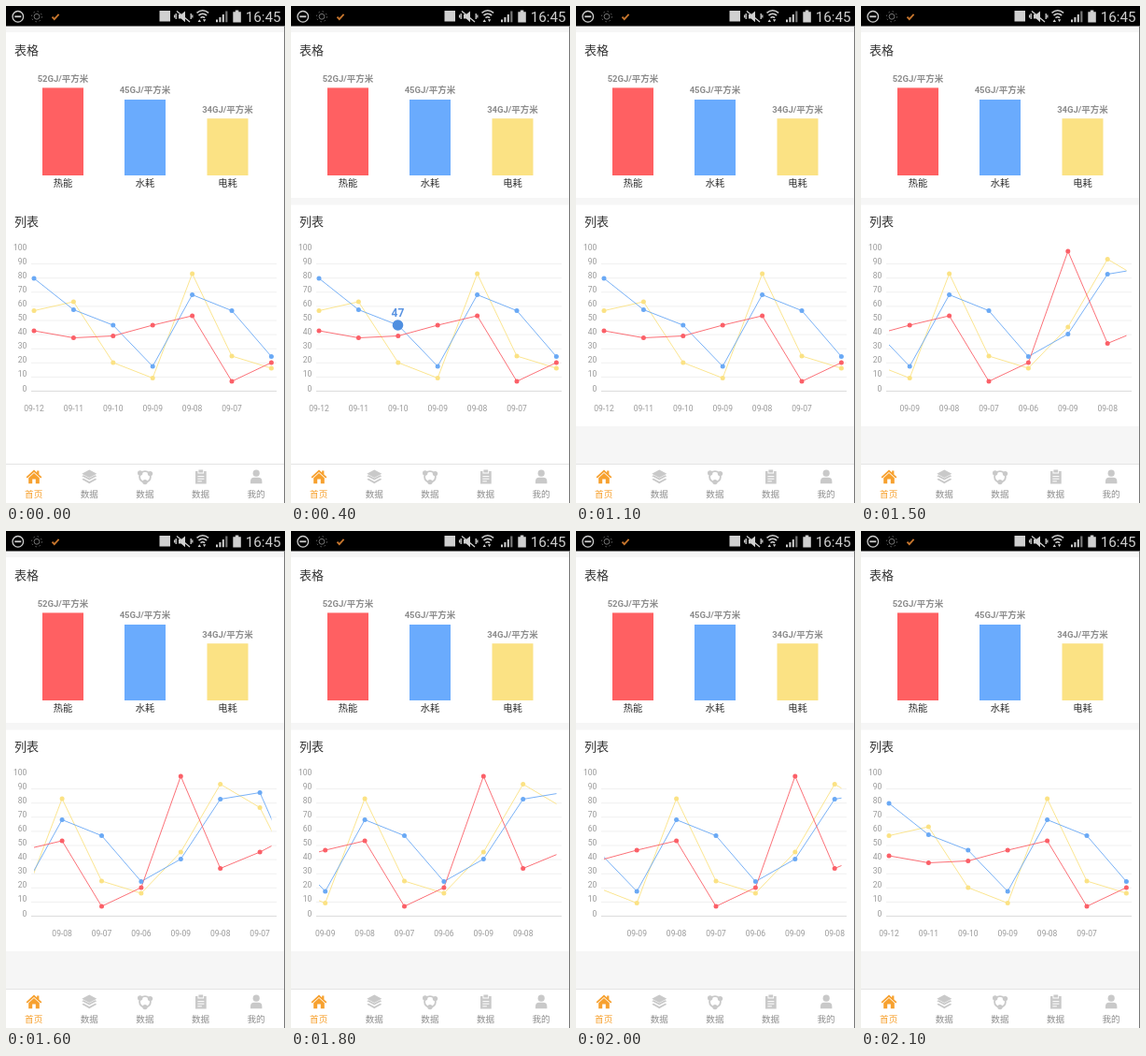
These frames come from a looping animation (299 px wide and 531 px high, 2.4 s). An HTML page:

```html
<!DOCTYPE html>
<html lang="zh">
<head>
<meta charset="utf-8">
<style>
html, body { margin: 0; width: 100%; height: 100%; overflow: hidden; background: #fff; }
svg { display: block; width: 100vw; height: 100vh; font-family: Roboto, "Noto Sans CJK SC", "Noto Sans CJK", sans-serif; }
text { text-anchor: middle; }
.line { fill: none; stroke-width: .9; }
</style>
</head>
<body>
<svg id="stage" viewBox="0 0 299 531" preserveAspectRatio="none">
  <defs><clipPath id="plot"><rect x="30" y="240" width="254.5" height="190"/></clipPath></defs>
  <rect width="299" height="531" fill="#fff"/>
  <rect y="21" width="299" height="7" fill="#f6f6f6"/>
  <rect id="gap" y="205" width="299" height="7.5" fill="#f6f6f6"/>
  <rect id="foot" y="449" width="299" height="40" fill="#f6f6f6"/>
  <g id="bars"></g>
  <g id="grid"></g>
  <g id="chart"></g>
  <g id="tip">
    <circle cx="114.5" cy="341" r="5.8" fill="#4f8fe0"/>
    <text x="114.5" y="331.8" font-size="12" font-weight="700" fill="#5b94e2">47</text>
  </g>
  <path d="M0 489.5H299" stroke="#e4e4e4"/>
  <g id="tabs"></g>
  <g fill="#c9c9c9">
    <path fill="#f7a12f" d="M21.6 503.3L30 495.6l3.2 2.9v-1.9h2.2v4l3 2.7-1.2 1.3-7.2-6.5-7.2 6.5zM24.2 504.2l5.8-5.2 5.8 5.2v6h-4v-4.6h-3.6v4.6h-4z"/>
    <path d="M89.3 495.6l8 4.2-8 4.2-8-4.2zM81.3 502.2l1.8-.9 6.2 3.2 6.2-3.2 1.8.9-8 4.2zM81.3 505.7l1.8-.9 6.2 3.2 6.2-3.2 1.8.9-8 4.5z"/>
    <circle cx="149" cy="503" r="5.9" fill="none" stroke="#c9c9c9" stroke-width="1.8"/>
    <circle cx="143.7" cy="499" r="2.7"/><circle cx="154.5" cy="499.6" r="2.7"/><circle cx="149" cy="508.6" r="2.7"/>
    <path d="M203 497h2.5v2.6h6.6V497h2.6v13.5H203zM206.4 495.4h4.8v3.2h-4.8z"/>
    <path d="M205.4 502.6h7M205.4 505.2h7M205.4 507.8h4.5" stroke="#fff"/>
    <circle cx="268.2" cy="499.2" r="3.6"/>
    <path d="M262 510.3v-2.4q0-4.1 4-4.1h4.4q4 0 4 4.1v2.4z"/>
  </g>
  <rect width="299" height="21.5" fill="#000"/>
  <g fill="none" stroke="#d0d0d0" stroke-width="1.3">
    <circle cx="12.8" cy="11.3" r="5.8"/>
    <path d="M9.3 11.3h7" stroke-width="1.8"/>
    <g stroke="#777" stroke-width="1">
      <circle cx="33" cy="11.3" r="2.9"/>
      <circle cx="33" cy="11.3" r="5.5" stroke-dasharray="1.3 3.02"/>
    </g>
    <path d="M49.5 11.6l2.3 2.5 4.8-5.2" stroke="#c9772e" stroke-width="1.8"/>
    <path d="M183 5.5l14 11.5M182.2 8v6M180.6 9.5v3M198.2 8v6M199.8 9.5v3"/>
    <path d="M204.5 7.3q6.3-5 12.6 0M206.5 10q4.3-3.4 8.6 0M208.5 12.6q2.3-1.8 4.6 0" stroke-width="1.6"/>
  </g>
  <g fill="#d0d0d0">
    <rect x="164.5" y="5" width="11.5" height="11.5"/>
    <path d="M185 9h2.7l4.3-3.6v11.8L187.700 13.600H185z"/>
    <path d="M207.300 14.200l1.700 2.800h-3.400zM212.600 17l1.700-2.800h-3.400z"/>
    <path d="M225 14.500h2v2.800h-2zM228.400 12h2v5.300h-2zM231.800 9h2v8.300h-2z"/>
    <path d="M235.200 5.500h2.200v11.800h-2.200z" fill="#777"/>
    <path d="M243.300 6.200h2.500V4.500h3.500v1.700h2.500v11.200h-8.500z"/>
    <text x="275.700" y="17" font-size="15.200">16:45</text>
  </g>
  <path d="M298.500 21.500V531" stroke="#777"/>
</svg>
<script>
const $ = id => document.getElementById(id);
const LOOP = 2400, LEFT = 30, RIGHT = 284.5, STEP = 42.4;

function add(parent, tag, attrs, content) {
  const el = document.createElementNS('http://www.w3.org/2000/svg', tag);
  for (const k in attrs) el.setAttribute(k, attrs[k]);
  if (content !== undefined) el.textContent = content;
  parent.appendChild(el);
  return el;
}
const label = (parent, text, x, y, size, fill, extra) =>
  add(parent, 'text', { x, y, 'font-size': size, fill, ...extra }, text);

// Bar section
label($('bars'), '表格', 9, 51.8, 13, '#333', { style: 'text-anchor:start' });
label($('bars'), '列表', 9, 234.8, 13, '#333', { style: 'text-anchor:start' });
[['热能', 52, 39, 87.4, '#ff6062'], ['水耗', 45, 127, 100, '#6aabfd'], ['电耗', 34, 215.5, 120.2, '#fbe284']]
  .forEach(([name, value, x, y, fill]) => {
    add($('bars'), 'rect', { x, y, width: 44, height: 181 - y, fill });
    label($('bars'), value + 'GJ/平方米', x + 22, y - 6.6, 9.5, '#8c8c8c', { 'font-weight': 600 });
    label($('bars'), name, x + 22, 193.3, 10.3, '#333');
  });

// Axis
for (let k = 0; k <= 10; k++) {
  const y = 411.5 - 15.1 * k;
  if (k < 10) add($('grid'), 'path', { d: `M27 ${y}H290`, stroke: k ? '#f0f0f0' : '#dcdcdc' });
  label($('grid'), k * 10, 22.3, y, 8.5, '#999', { style: 'text-anchor:end' });
}

// Series: heights of the points, left to right
const series = [
  ['#fbe284', [325.5, 316, 381, 397.5, 286, 374, 387, 343, 270.5, 295.5, 379]],
  ['#6aa9f5', [291, 324.5, 341, 385, 308.5, 325.5, 374.5, 350.5, 286.5, 279.5, 375.5]],
  ['#fb6068', [347, 354.5, 352.5, 341, 331, 401, 381, 262, 360.5, 343, 321]]
];
const days = ['12', '11', '10', '09', '08', '07', '06', '09', '08', '07', '06'];
const xAt = i => LEFT + i * STEP;
const lines = add(add($('chart'), 'g', { 'clip-path': 'url(#plot)' }), 'g', {});
const marks = add($('chart'), 'g', {});
const dots = [];
for (const [color, ys] of series) {
  add(lines, 'polyline', { class: 'line', stroke: color, points: ys.map((y, i) => [xAt(i), y]).join(' ') });
  ys.forEach((cy, i) => dots.push([i, add(marks, 'circle', { cx: xAt(i), cy, r: 2.5, fill: color })]));
}
const dates = days.map((d, i) => label(marks, '09-' + d, xAt(i), 432.6, 8.5, '#999'));

// Tab bar
['首页', '数据', '数据', '数据', '我的'].forEach((name, i) =>
  label($('tabs'), name, 29.7 + i * 59.6, 525.2, 9.6, i ? '#8f8f8f' : '#f7a12f'));

// Start time and scroll distance
const scroll = [[0, 0], [1400, 45], [1500, 105], [1600, 139.5], [1700, 128],
                [1800, 120.5], [1900, 191], [2000, 92], [2100, 0]];
const show = (el, on) => { el.style.display = on ? '' : 'none'; };

function draw(t) {
  const shift = scroll.filter(s => s[0] <= t).pop()[1];
  const move = `translate(${-shift} 0)`;
  lines.setAttribute('transform', move);
  marks.setAttribute('transform', move);
  for (const [i, dot] of dots) {
    const x = xAt(i) - shift;
    show(dot, x >= LEFT && x <= RIGHT);
  }
  dates.forEach((el, i) => {
    const x = xAt(i) - shift;
    show(el, x >= LEFT && x < 280);
  });
  show($('tip'), t >= 400 && t < 800);
  show($('gap'), t >= 400);
  show($('foot'), t >= 800);
}

const start = performance.now();
function tick() {
  draw((performance.now() - start) % LOOP);
  requestAnimationFrame(tick);
}
tick();
</script>
</body>
</html>
```
